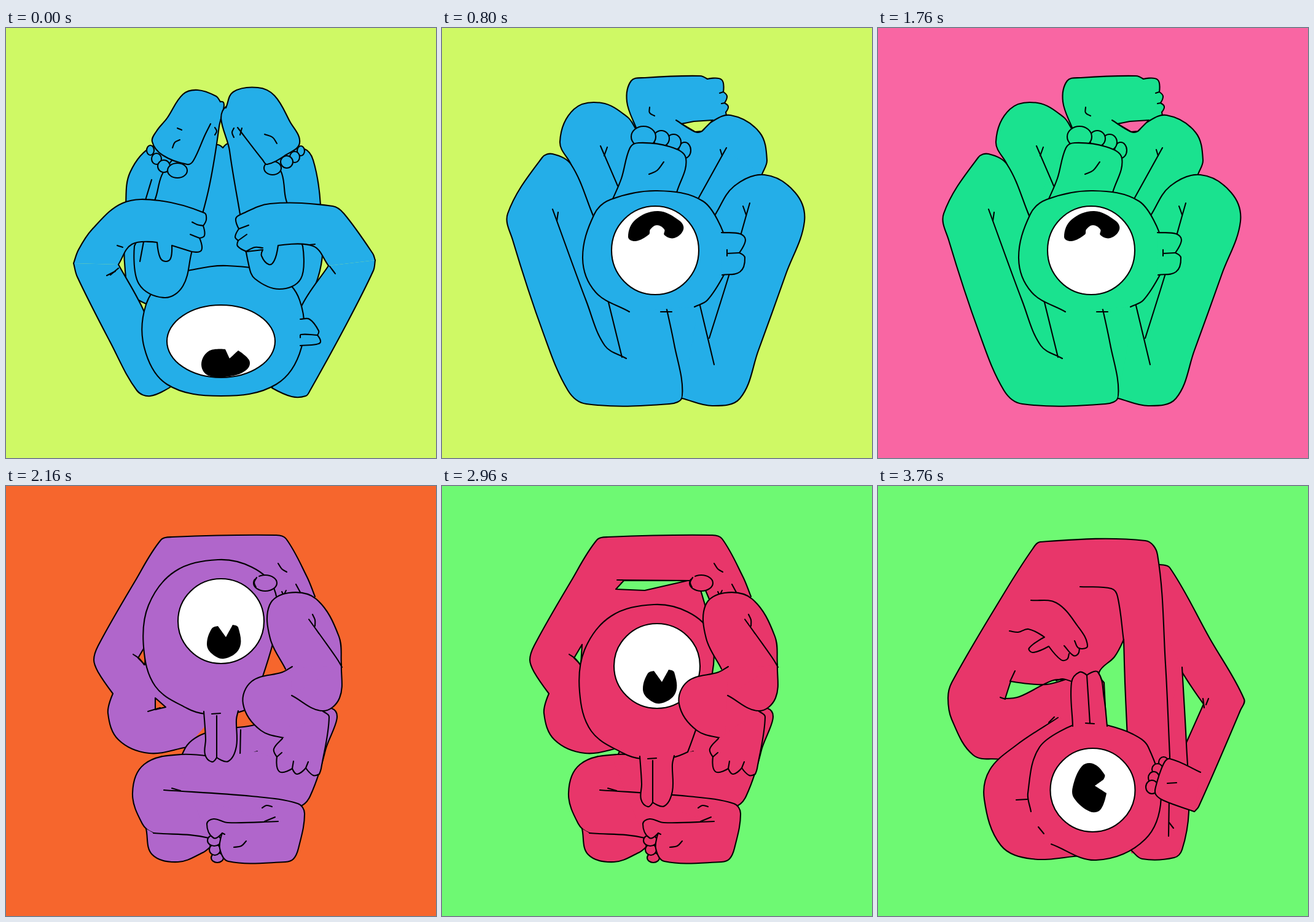
Recreate the animation shown at these times as an HTML page. Size 700 by 700 pixels, loop 3840 ms.

```html
<!DOCTYPE html>
<html lang="en">
<head>
<meta charset="utf-8">
<title>Tumbling cyclops</title>
<style>
html, body { margin: 0; width: 100%; height: 100%; overflow: hidden; }
svg { display: block; width: 100%; height: 100%; background: var(--bg); color: var(--skin); }
svg * { stroke: #000; stroke-width: 2.1; stroke-linejoin: round; stroke-linecap: round; fill: none; }
.skin { fill: currentColor; }
.flat { fill: currentColor; stroke: none; }
.gap { fill: var(--bg); }
.eye { fill: #fff; }
.pupil { fill: #000; stroke: none; }
</style>
</head>
<body>
<svg id="stage" viewBox="0 0 700 700" preserveAspectRatio="none"></svg>
<script>
const STEP = 80;
const palettes = [
  { bg: '#cff965', skin: '#24aee8' },
  { bg: '#f966a3', skin: '#1ae28f' },
  { bg: '#f6662d', skin: '#b066cb' },
  { bg: '#6ef973', skin: '#e8366a' }
];

let out = '';

// Points marked "!" are corners.
function parse(text) {
  return text.trim().split(' ').map(s => {
    const [x, y] = s.split(',').map(parseFloat);
    return { x, y, corner: s.endsWith('!') };
  });
}

// Smooth curve through the points; each handle is about a third of its segment.
function curve(text, closed) {
  const pts = parse(text), n = pts.length;
  const at = i => closed ? pts[(i + n) % n] : pts[Math.max(0, Math.min(n - 1, i))];
  const handle = (i, len) => {
    const p = at(i), a = at(i - 1), b = at(i + 1);
    if (p.corner) return [0, 0];
    const dx = b.x - a.x, dy = b.y - a.y, k = len * 0.35 / (Math.hypot(dx, dy) || 1);
    return [dx * k, dy * k];
  };
  let d = `M${pts[0].x} ${pts[0].y}`;
  for (let i = 0; i < (closed ? n : n - 1); i++) {
    const p = at(i), q = at(i + 1), len = Math.hypot(q.x - p.x, q.y - p.y);
    const [ax, ay] = handle(i, len), [bx, by] = handle(i + 1, len);
    const c = [p.x + ax, p.y + ay, q.x - bx, q.y - by].map(v => v.toFixed(1));
    d += `C${c.join(' ')} ${q.x} ${q.y}`;
  }
  return closed ? d + 'Z' : d;
}

const path = (cls, closed) => text => { out += `<path class="${cls}" d="${curve(text, closed)}"/>`; };
const blob = path('skin', true);
const limb = path('skin', false);
const line = path('line', false);
const gap = path('gap', true);
const pupil = path('pupil', true);
const flat = text => { out += `<polygon class="flat" points="${text}"/>`; };
const oval = cls => (x, y, rx, ry) => {
  out += `<ellipse class="${cls}" cx="${x}" cy="${y}" rx="${rx}" ry="${ry}"/>`;
};
const toe = oval('skin');
const eye = oval('eye');
function head(lift, parts) {
  out += `<g transform="translate(0 ${lift})">`;
  parts();
  out += '</g>';
}

function curl(lift) {
  blob('240,192 202,235 195,290 194,395 210,440 350,480 470,460 511,395 512,288 500,215 484,196 430,190 362,188 353,195! 345,190 300,190');
  limb('110,383 116,405 170,512 213,590 235,599 270,583! 225,462 183,385');
  limb('601,378 598,395 550,490 495,590 488,599 465,600 433,586! 480,455 525,387');
  head(lift, () => {
    blob('296,395 360,387 440,402 478,443 481,520 440,580 350,599 262,580 225,520 228,450 262,405');
    limb('479,474 494,474 509,493 507,500! 512,511 505,515 479,517');
    line('507,500 480,499 479,504');
    eye(350, 510, 88, 59);
    pupil('318,548 330,526 357,523! 364,538! 378,525! 396,541 393,555 370,566 330,566');
  });
  curlLeftLeg();
  curlRightLeg();
  curlHands();
}

function curlLeftLeg() {
  blob('349,120 347,160 330,262 302,366 288,420 258,439 216,416 209,355! 243,278 256,235 310,170!');
  line('237,247 227,280');
  line('224,348 218,380');
  toe(235, 199, 6, 8);
  toe(245, 213, 8, 9);
  toe(257, 225, 10, 10);
  toe(279, 232, 16, 12);
  limb('349,120 342,111 312,101 288,108 262,147 245,168 238,185 255,207 295,222 305,216 324,174 333,156');
  line('271,195 275,186 283,182');
  line('279,163 286,166');
  line('340,162 343,168 340,174');
}

function curlRightLeg() {
  blob('358,128 364,200 381,303 395,385 405,408 445,425 480,408 483,355! 456,280 447,232 400,170!');
  toe(480, 200, 6, 8);
  toe(470, 210, 8, 9);
  toe(457, 218, 10, 10);
  toe(434, 228, 14, 11);
  limb('358,130 370,104 410,97 437,110 462,152 478,187 455,207 425,222 418,215 377,162');
  line('421,173 434,178 441,188');
  line('371,163 368,170 371,178');
  line('384,163 381,174');
}

function curlHands() {
  limb('183,385 205,352 246,349! 251,374 260,380 268,375 270,354! 302,364! 318,362 315,342! 323,338 321,322! 326,312 323,301 250,281 190,285 140,328 118,361 110,383');
  line('321,322 311,320 303,316');
  line('315,342 300,336');
  limb('525,387 500,355 443,354! 437,378 428,385 416,371 418,361! 392,364! 377,355 378,346! 373,340 379,327! 374,311 381,304 430,286 532,290 550,302 597,367 601,378');
  line('379,327 395,321');
  line('378,346 392,336');
  line('390,364 405,357 418,358');
  line('164,403 178,396');
  line('170,402 183,391');
  line('181,354 190,357');
  line('494,353 503,352');
  line('527,388 536,400');
}

function duck(lift) {
  duckArms();
  duckLegs();
  head(lift, () => {
    blob('345,148 275,167 232,222 224,290 243,354 295,390 325,399 375,397 400,388! 440,260 436,194 400,160');
    limb('322,395 325,440 324,465 335,477 343,470! 362,476 375,452 375,408 378,394');
    line('343,470 343,402');
    line('335,399 349,398');
    eye(350, 248, 70, 69);
    pupil('327,285 335,260 345,256! 358,274! 369,254! 378,258 380,292 355,309 334,300');
  });
  duckFold();
}

function duckArms() {
  limb('295,425 233,435 183,413 166,370 174,338! 150,303 143,283 150,260 210,155 252,88 270,83 440,80 456,86 490,148 503,180');
  blob('290,430 325,402 400,390 530,362 520,430 495,505 477,522 400,530 280,500');
  gap('296,154! 283,168! 330,170! 400,154!');
  gap('228,258! 215,280! 226,291!');
  gap('243,345! 243,364! 260,360!');
  gap('420,166! 429,170! 440,196! 430,200!');
  line('285,153 405,154');
  line('207,274 217,281 225,291');
  line('231,367 251,361');
  line('382,397 381,440');
}

function duckLegs() {
  limb('409,432 375,443 285,437 225,453 206,500 222,550 240,565 280,572 340,575');
  flat('280,450 409,432 507,470 477,521 470,600 360,605 330,575');
  limb('228,558 238,600 280,612 320,597 332,588! 330,573 240,565');
  toe(344, 605, 10, 8);
  toe(340, 592, 9, 9);
  toe(339, 577, 11, 9);
  limb('257,495 400,505 475,517 486,533 476,590 468,607 455,612 362,611 348,590 352,565! 338,573 327,550 338,542 361,548 443,546');
  line('352,565 356,567');
  line('270,492 284,496');
  line('417,524 424,520 433,522');
  line('421,546 438,539');
  line('371,588 383,586 391,578');
}

function duckFold() {
  toe(422, 158, 19, 13);
  flat('405,149 411,145 414,166 408,166');
  line('408,149 404,157 407,165');
  line('443,126 449,135 457,140');
  line('449,172 452,176 456,170');
  line('472,160 479,173');
  flat('455,290 546,285 530,360 526,376 512,466 461,462');
  limb('455,298 430,248 429,194 460,174 505,184 542,245 546,292');
  limb('466,294 450,303 400,318 386,355 415,398 461,412');
  limb('546,290 543,345 515,366 465,341');
  limb('515,366 526,376 513,460 510,469! 500,471 488,459! 474,469 466,460! 445,465 441,441! 436,428 450,411');
  line('466,460 468,448');
  line('488,459 492,449');
  line('441,441 449,434');
  line('493,217 538,280 547,295');
  line('499,209 503,218 503,228');
}

function tall(lift) {
  flat('240,60 470,60 513,160 486,305 420,420 405,610 290,615 295,380 235,349 200,230');
  limb('300,52 290,46 230,47 222,56 186,138 182,153 198,250 210,300 235,351');
  limb('410,55 420,44 468,45 476,53 525,150 515,210 498,288 488,308');
  line('299,250 302,372');
  line('402,250 402,388');
  line('354,260 356,522');
  tallLeftLeg();
  tallRightLeg();
  head(lift, () => {
    limb('306,264 272,222 266,110 277,56 295,47 380,43 420,56 430,123 429,210 396,265');
    line('329,273 350,277 381,273');
    limb('427,123 440,123 450,130 445,144! 449,150 441,168 427,170');
    line('445,144 434,146');
    line('432,140 433,151');
    eye(348.5, 139, 67.5, 68);
    pupil('320,107! 340,90 367,105 357,136 340,141 320,126! 337,116!');
  });
}

function tallLeftLeg() {
  limb('338,557 322,445 302,372 287,342 245,341 222,375 240,465 272,605 284,632 380,632 388,626');
  line('272,378 290,460 320,596! 360,594');
  line('275,389 279,384');
  line('336,543 342,556');
  line('276,589 275,597 282,601');
  limb('357,595 368,599! 375,600 373,607! 380,608 378,615! 386,618 387,627');
}

function tallRightLeg() {
  limb('390,482 403,390 428,302 465,291 490,315 482,390 467,485 434,625');
  flat('395,480 470,450 435,610 400,610');
  line('445,344 424,455 406,525');
  line('437,347 438,354 441,358');
  line('383,470 391,465');
  line('438,570 442,577 436,584');
  toe(356, 537, 11, 14);
  toe(369, 529, 9, 10);
  toe(383, 528, 9, 9);
  toe(398, 533, 9, 10);
  limb('412,580 408,545 402,534 365,541 351,560 362,591 388,628 420,636 435,615 433,602');
  line('373,556 380,566 389,572');
  line('384,598 403,593');
}

function fold(lift) {
  foldBack();
  foldFoot();
  foldArms();
  head(lift, () => {
    limb('305,462 250,430 229,375 248,303 275,279 350,265 425,282 458,333! 460,400! 432,443 411,454');
    limb('455,333 485,335 494,345 484,366! 493,374 485,397 456,402');
    line('484,366 464,367');
    line('464,361 464,371');
    line('356,462 374,462');
    eye(347, 362, 71, 72);
    pupil('303,340 315,312 352,298 387,314 393,328 378,342 362,337 362,328 350,321 339,328 337,336 315,347');
  });
}

function foldBack() {
  flat('310,150 381,150 412,169 440,165 521,238 450,310 247,308 310,165');
  limb('317,165 301,120 308,86 330,81 420,78 432,83! 455,84 458,104! 464,111 460,122! 466,128 462,137! 464,149! 390,156');
  line('458,104 452,106');
  line('460,122 455,123');
  line('338,129 338,138 346,143');
  limb('247,308 210,222 192,185 215,132 260,122 302,145 316,165');
  line('258,192 286,257');
  line('264,208 269,194');
  limb('381,150 412,169 423,168 435,155 470,142 517,170 529,215 521,238');
  gap('390,156! 410,152! 441,150! 423,168! 412,169!');
  line('463,195 417,278');
  line('453,198 456,208');
}

function foldFoot() {
  toe(395, 199, 10, 13);
  toe(377, 186, 12, 13);
  toe(357, 180, 13, 13);
  toe(328, 177, 20, 17);
  limb('275,285 292,245 306,195 320,187 370,193 397,212 382,268');
  line('337,238 350,232 361,218');
}

function foldArms() {
  flat('120,310 175,220 250,310 450,310 530,245 585,310 480,604 215,604');
  limb('247,308 210,222 180,205 163,211 107,302 115,345 165,497 205,590 235,612 370,612 391,600 378,515 355,410');
  line('180,295 235,445 265,517 300,538');
  line('189,300 187,314');
  line('262,410 293,536');
  limb('444,305 475,258 525,239 575,268 590,315 560,400 515,525 485,603 440,615 391,603');
  line('501,285 470,393 435,505');
  line('490,290 495,304');
  line('410,410 443,548');
}

function dive(lift) {
  diveBack();
  diveTorso();
  head(lift, () => {
    limb('282,583 355,609 435,575 461,505 440,425 415,404 372,389! 318,389! 263,425 244,500 249,530');
    line('261,555 270,566');
    limb('317,391 315,320 328,303 340,308! 358,303 368,345 373,391');
    line('340,308 345,386');
    line('338,386 352,387');
    eye(349.5, 495, 69, 68);
    pupil('317,490 332,456 350,452 369,470 367,478! 353,488! 372,500! 362,527 345,530 319,508');
  });
  toe(465, 450, 8, 9);
  toe(455, 461, 9, 9);
  toe(449, 475, 9, 10);
  toe(446, 490, 10, 11);
  limb('525,466 475,444 465,452 452,490 452,502 465,512 515,530');
  line('471,484 486,483');
}

function diveBack() {
  limb('488,449 530,355! 466,245 457,128! 475,133 540,248 596,347 590,365 522,522 515,530');
  line('529,346 531,361');
  line('538,346 534,356');
  flat('464,230 495,297 505,530 490,598 412,598 406,400 440,250');
  limb('495,295 502,420 506,530 495,592 482,605 430,607 412,593');
  limb('199,445 155,438 120,380 114,345 120,320 205,175 252,102 264,91 435,89 455,112 468,290 475,440');
  gap('360,303 385,278 400,250! 402,320 406,410! 372,400! 368,320!');
  line('329,164 380,167 390,180 400,252');
  gap('216,318! 207,346! 230,343 283,317 305,315! 275,323 245,322');
  line('223,301 215,318');
  line('199,344 207,347');
  line('290,317 300,314 315,318');
  line('475,440 473,570');
  line('474,548 481,557');
}

function diveTorso() {
  flat('199,445 293,377 380,400 330,602 215,595 180,500');
  limb('293,377 225,422 182,462 173,510 200,585 250,607 330,602');
  line('278,385 287,376');
  line('225,511 243,510');
  line('249,186 290,190 325,228 341,260 327,264 320,252');
  line('328,264 326,273 318,276 303,260');
  line('311,273 308,282 298,283 278,261! 252,271 246,264 271,246! 245,233 228,238 214,236');
}

// One tumble: pose, head lift, breadth
const pose = (draw, lift = 0, breadth = 1) => {
  out = `<g transform="translate(350 0) scale(${breadth} 1) translate(-350 0)">`;
  draw(lift);
  return out + '</g>';
};
const tumble = [
  pose(curl),
  pose(duck, 45), pose(duck), pose(duck, -28),
  pose(tall, 20), pose(tall, 7), pose(tall), pose(tall, 9),
  pose(fold, -65, 1.007), pose(fold, -38, 1.004), pose(fold),
  pose(dive)
];

const stage = document.getElementById('stage');
const count = tumble.length * palettes.length;
const start = performance.now();
let shown = -1;

function draw(ms) {
  const step = Math.floor(ms / STEP) % count;
  if (step === shown) return;
  shown = step;
  const { bg, skin } = palettes[Math.floor(step / tumble.length)];
  stage.style.setProperty('--bg', bg);
  stage.style.setProperty('--skin', skin);
  stage.innerHTML = tumble[step % tumble.length];
}

function tick() {
  draw(performance.now() - start);
  requestAnimationFrame(tick);
}
draw(0);
requestAnimationFrame(tick);
</script>
</body>
</html>
```
